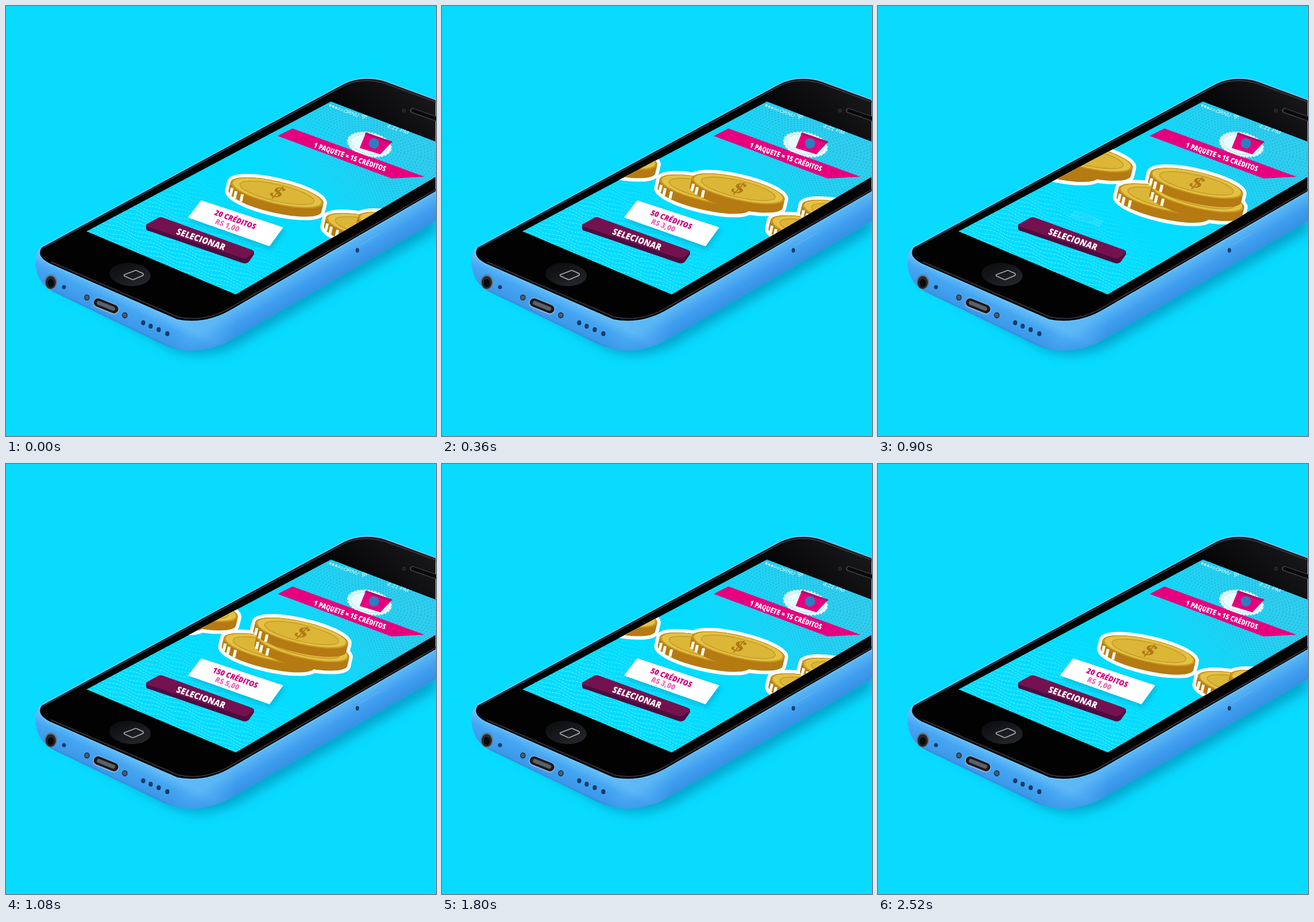
Animation of 749 by 748 pixels, one loop 2700 ms. Source, as an HTML page:

```html
<!DOCTYPE html>
<html lang="pt">
<head>
<meta charset="utf-8">
<title>Créditos</title>
<style>
  html, body { margin: 0; width: 100%; height: 100%; overflow: hidden; background: #08dbff; }
  svg { display: block; width: 100vw; height: 100vh; }
  text { text-anchor: middle; }
  .bold { font: italic 800 14px "Open Sans", sans-serif; fill: #fff; }
  .status { font: 9.5px "Liberation Sans", sans-serif; fill: #e9fbff; }
  .sign { font: bold 38px "Noto Serif", serif; fill: #b07a13; }
</style>
</head>
<body>
<svg viewBox="0 0 749 748">
  <defs>
    <clipPath id="glass"><path d="M566 166L749 236V297L400 502L140 392Z"/></clipPath>
    <filter id="soft" x="-20%" y="-20%" width="140%" height="140%"><feGaussianBlur stdDeviation="10"/></filter>
    <filter id="blur" x="-20%" y="-40%" width="140%" height="180%"><feGaussianBlur stdDeviation="4"/></filter>
    <linearGradient id="side" gradientUnits="userSpaceOnUse" x1="440" y1="506" x2="468" y2="554">
      <stop offset="0" stop-color="#58b4f5"/><stop offset=".35" stop-color="#409ff0"/>
      <stop offset=".75" stop-color="#3590e4"/><stop offset="1" stop-color="#2474c4"/>
    </linearGradient>
    <linearGradient id="end" gradientUnits="userSpaceOnUse" x1="188" y1="498" x2="166" y2="544">
      <stop offset="0" stop-color="#62bbf8"/><stop offset=".3" stop-color="#45a6f2"/>
      <stop offset=".8" stop-color="#3c98ea"/><stop offset="1" stop-color="#287bcc"/>
    </linearGradient>
    <linearGradient id="mix" gradientUnits="userSpaceOnUse" x1="290" y1="0" x2="400" y2="0">
      <stop offset="0" stop-color="#000"/><stop offset="1" stop-color="#fff"/>
    </linearGradient>
    <mask id="right"><rect width="749" height="748" fill="url(#mix)"/></mask>
    <linearGradient id="screen" gradientUnits="userSpaceOnUse" x1="660" y1="200" x2="480" y2="340">
      <stop offset="0" stop-color="#2fcdee"/><stop offset="1" stop-color="#04dcff"/>
    </linearGradient>
    <linearGradient id="fadeTop" gradientUnits="userSpaceOnUse" x1="655" y1="215" x2="545" y2="310">
      <stop offset=".45" stop-color="#fff"/><stop offset="1" stop-color="#000"/>
    </linearGradient>
    <linearGradient id="fadeLow" gradientUnits="userSpaceOnUse" x1="250" y1="450" x2="385" y2="300">
      <stop offset=".35" stop-color="#fff"/><stop offset="1" stop-color="#000"/>
    </linearGradient>
    <mask id="top"><rect width="749" height="748" fill="url(#fadeTop)"/></mask>
    <mask id="low"><rect width="749" height="748" fill="url(#fadeLow)"/></mask>
    <linearGradient id="home" x1="0" y1="0" x2="1" y2="1">
      <stop offset="0" stop-color="#08090b"/><stop offset="1" stop-color="#282a2f"/>
    </linearGradient>
    <linearGradient id="face" gradientUnits="userSpaceOnUse" x1="700" y1="130" x2="600" y2="230">
      <stop offset="0" stop-color="#17171a"/><stop offset="1" stop-color="#020203"/>
    </linearGradient>
    <path id="edge" d="M-83 0A83 20 0 0 1 83 0V15A83 20 0 0 1 -83 15Z" transform="rotate(13)"/>
    <g id="coin">
      <use href="#edge" fill="#b57a12"/>
      <g transform="rotate(13)">
        <path d="M-78 9V22M-70 13V26M-58 16V29" stroke="#fffbe8" stroke-width="5"/>
        <ellipse rx="83" ry="20" fill="#c8961f"/>
        <ellipse cy="-.5" rx="79" ry="18.5" fill="#e4c243"/>
        <ellipse rx="66" ry="14.5" fill="#dcb637" stroke="#c39a2a" stroke-width="1.5"/>
      </g>
      <text class="sign" transform="matrix(1 .3 -.6 .65 -7 8)">$</text>
    </g>
  </defs>

  <rect width="749" height="748" fill="#08dbff"/>
  <path d="M62 470L275 590Q330 622 400 592L749 392V340L300 500Z" fill="#046f9c" opacity=".5" filter="url(#soft)"/>

  <!-- body -->
  <path id="shell" d="M58 422C48 432 50 456 57 471Q64 488 86 499L272 588Q325 613 384 585L749 374V300L380 500L90 420Z" fill="url(#end)"/>
  <path d="M58 422C48 432 50 456 57 471Q64 488 86 499L272 588Q325 613 384 585L749 374V300L380 500L90 420Z" fill="url(#side)" mask="url(#right)"/>
  <path d="M62 419L588 135Q622 119 662 131L749 163V323L396 527Q348 556 298 546L76 449Q50 436 62 419Z" fill="url(#face)" stroke="#6cc3fa" stroke-width="2"/>
  <path d="M66 420L590 138Q622 123 661 135L749 167" fill="none" stroke="#35373b" stroke-width="2"/>
  <path d="M749 319L394 523Q348 551 300 541L78 445" fill="none" stroke="#303238" stroke-width="2"/>

  <!-- ports -->
  <ellipse cx="78" cy="480" rx="11" ry="13" fill="#6c7684"/>
  <ellipse cx="78" cy="481" rx="9" ry="11" fill="#26282d"/>
  <ellipse cx="78" cy="482" rx="5.5" ry="7" fill="#08090b"/>
  <g transform="rotate(22 174 522)">
    <rect x="150" y="513" width="48" height="18" rx="9" fill="#8fb4d4"/>
    <rect x="151.5" y="514" width="45" height="15" rx="7.5" fill="#17191d"/>
    <rect x="157" y="518" width="34" height="7" rx="3.5" fill="#5b6068"/>
  </g>
  <g fill="#4f5b69" stroke="#1c2b40" stroke-width="1.5">
    <ellipse cx="141" cy="507" rx="4" ry="4.5"/><ellipse cx="207" cy="538" rx="4" ry="4.5"/>
  </g>
  <g fill="#123c68">
    <circle cx="101" cy="489" r="3.5"/>
    <ellipse cx="239" cy="551" rx="3.7" ry="4.3"/><ellipse cx="252" cy="557" rx="3.7" ry="4.3"/>
    <ellipse cx="266" cy="563" rx="3.7" ry="4.3"/><ellipse cx="281" cy="570" rx="3.7" ry="4.3"/>
    <ellipse cx="612" cy="425" rx="3" ry="4"/>
  </g>
  <path d="M616 416L652 395" stroke="#68b9f3" stroke-width="1"/>

  <!-- front details -->
  <ellipse cx="216" cy="467" rx="36" ry="20" transform="rotate(5 216 467)" fill="url(#home)"/>
  <path d="M223 461Q226 459 229 461L238 465Q241 467 238 469L224 475Q221 477 218 475L207 470Q204 468 207 467Z" fill="none" stroke="#a9acb0" stroke-width="1.6"/>
  <circle cx="693" cy="182" r="3" fill="#1d1e28" stroke="#33343c"/>
  <path d="M708 182L749 196" stroke="#3a3b40" stroke-width="9" stroke-linecap="round"/>
  <path d="M709 182L749 196" stroke="#08080a" stroke-width="6" stroke-linecap="round"/>

  <g clip-path="url(#glass)">
    <path d="M566 166L749 236V297L400 502L140 392Z" fill="url(#screen)"/>
    <g mask="url(#top)"><g id="rings" fill="none" stroke="#149dc8" stroke-width="1.3" stroke-dasharray="2 3.5" opacity=".65"></g></g>
    <g mask="url(#low)"><g id="waves" fill="none" stroke="#b9f5fb" stroke-width="1" stroke-dasharray="4 2" opacity=".65"></g></g>

    <!-- status bar -->
    <g fill="#e9fbff">
      <circle cx="565" cy="173" r="2"/><circle cx="570" cy="175" r="2"/><circle cx="575" cy="177" r="2"/>
      <g fill="none" stroke="#e9fbff" stroke-width=".7"><circle cx="580" cy="179" r="1.7"/><circle cx="585" cy="181" r="1.7"/></g>
    </g>
    <text class="status" transform="matrix(.93 .33 -.5 .8 600 189)">ORNU</text>
    <g transform="matrix(.95 .33 -.5 .8 622 195)" fill="none" stroke="#e9fbff" stroke-width="1.3">
      <path d="M-5 -4Q0 -8 5 -4M-3 -1.5Q0 -4 3 -1.5M-1 .8H1"/>
    </g>
    <text class="status" transform="matrix(1.06 .36 -.5 .8 681 217)">4:21 PM</text>

    <!-- banner -->
    <path d="M499 213L729 297L672 300L473 226Z" fill="#e6007e"/>
    <g transform="rotate(12 633 241)">
      <ellipse cx="633" cy="241" rx="38" ry="20" fill="#e9fbff" stroke="#e9fbff" stroke-width="3" stroke-dasharray="4 2"/>
      <ellipse cx="633" cy="241" rx="33" ry="16.5" fill="none" stroke="#a6e6f4"/>
    </g>
    <path d="M627 220L673 236L652 258L616 247Z" fill="#e6007e"/>
    <path d="M627 220L673 236L670 239L625 223Z" fill="#b9056a"/>
    <circle cx="641" cy="239" r="9" fill="#2b7fc0"/>
    <path d="M585 245L690 283L672 300L570 262Z" fill="#e6007e"/>
    <text class="bold" transform="matrix(.72 .245 -.2 .9 598 267)">1 PAQUETE = 15 CRÉDITOS</text>

    <g id="track"></g>

    <!-- price label -->
    <g id="label">
      <path d="M342 346L487 389L462 424L320 374Z" fill="#037f9c" opacity=".35" filter="url(#blur)"/>
      <path d="M340 338L483 385L459 418L317 368Z" fill="#fff"/>
      <text id="credits" class="bold" style="fill:#d6007a" transform="matrix(.83 .3 -.3 .9 398 376)"></text>
      <text id="price" class="bold" style="fill:#f06bb4" transform="matrix(.83 .3 -.3 .9 384 386)"></text>
    </g>

    <!-- button -->
    <path d="M247 380Q242 383 245 390L412 447Q419 449 423 445L432 432V426L420 434Z" fill="#4b0d3d"/>
    <path d="M264 369Q268 366 273 368L428 424Q434 427 430 430L421 437Q417 440 411 438L247 384Q241 382 246 379Z" fill="#74124f"/>
    <text class="bold" style="font-size:17px" transform="matrix(.82 .28 -.25 .88 338 411)">SELECIONAR</text>
  </g>
</svg>

<script>
  const el = id => document.getElementById(id);

  // Background texture
  let rings = "", waves = "";
  for (let r = 8; r < 300; r += 6)
    rings += `<ellipse cx="633" cy="243" rx="${r}" ry="${r * 0.6}" transform="rotate(12 633 243)"/>`;
  for (let i = 0; i < 56; i++) {
    let d = "";
    for (let x = 0; x <= 420; x += 6) {
      const y = x * 0.37 + 2.5 * Math.sin(x / 9 + i * 1.3);
      d += `${x ? "L" : "M"}${130 + i * 7 - 60 + x} ${(400 - i * 3.9 + y - 22).toFixed(1)}`;
    }
    waves += `<path d="${d}"/>`;
  }
  el("rings").innerHTML = rings;
  el("waves").innerHTML = waves;

  // Each pack: place on the track, label and coin centres
  const packs = [
    { x: 0, y: 0, credits: "20 CRÉDITOS", price: "R$ 1,00", coins: [[472, 325]] },
    { x: 178, y: 67, credits: "50 CRÉDITOS", price: "R$ 3,00", coins: [[460, 320], [516, 318]] },
    { x: 371, y: 137, credits: "150 CRÉDITOS", price: "R$ 5,00", coins: [[460, 321], [517, 318], [515, 294]] }
  ];
  const place = (id, extra) => ([x, y]) => `<use href="#${id}" x="${x}" y="${y}" ${extra}/>`;
  el("track").innerHTML = packs.map(p =>
    `<g transform="translate(${p.x} ${p.y})">` +
    p.coins.map(place("edge", 'fill="#fff" stroke="#fff" stroke-width="12" stroke-linejoin="round"')).join("") +
    p.coins.map(place("coin", "")).join("") + "</g>").join("");

  const LOOP = 2700, STEP = 30, STEPS = 11;
  const moves = [[60, 0, 1], [780, 1, 2], [1500, 2, 1], [2220, 1, 0]];

  function draw(time) {
    const t = time % LOOP;
    const [start, from, to] = moves.filter(m => t >= m[0]).pop() || [-LOOP, 0, 0];
    const step = Math.min(STEPS, Math.floor((t - start) / STEP) + 1);
    const u = step / STEPS;
    const p = 1 - Math.pow(1 - u, 2.6);
    const a = packs[from], b = packs[to];
    const x = a.x + (b.x - a.x) * p, y = a.y + (b.y - a.y) * p;
    el("track").setAttribute("transform", `translate(${-x} ${-y})`);

    // The label shrinks away, swaps its text and grows back
    const hidden = from === to ? 0 : 1 - Math.abs(1 - 2 * u);
    const scale = 1 - 0.7 * hidden;
    const pack = u < 0.5 ? a : b;
    el("label").setAttribute("transform", `translate(343 366) scale(${scale}) translate(-343 -366)`);
    el("label").setAttribute("opacity", 1 - hidden);
    el("credits").textContent = pack.credits;
    el("price").textContent = pack.price;
  }

  const begin = performance.now();
  function frame() {
    draw(performance.now() - begin);
    requestAnimationFrame(frame);
  }
  frame();
</script>
</body>
</html>
```
